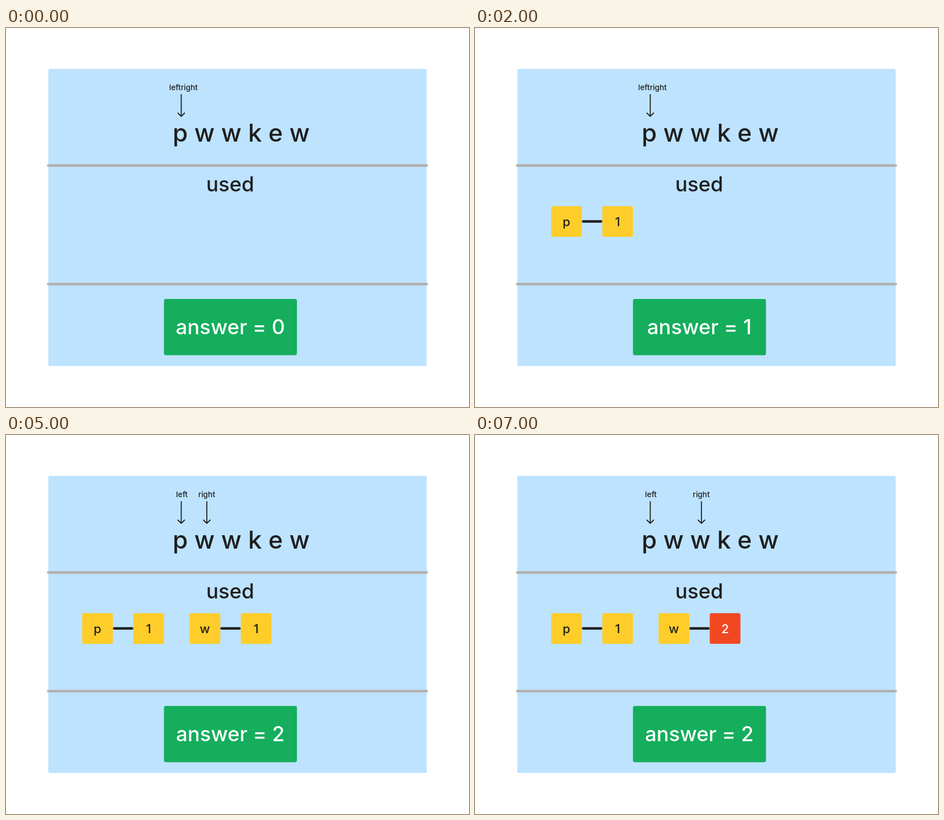
Write an HTML page that moves like this. It is 828 px wide and 677 px high and loops after 8000 ms.

```html
<!DOCTYPE html>
<html lang="en">
<head>
<meta charset="utf-8">
<title>Sliding window</title>
<style>
  html, body { margin: 0; width: 100%; height: 100%; overflow: hidden; background: #fff; }
  svg { display: block; width: 100%; height: 100%; }
  text {
    font-family: Inter, sans-serif;
    font-weight: 500;
    font-optical-sizing: none;
    text-anchor: middle;
    fill: #1e1e1e;
  }
  .small { font-size: 13.75px; }
  .tile { font-size: 22px; }
  .big { font-size: 36.6px; }
  .word { font-size: 43.9px; }
  .light { fill: #fff; }
  .rule { stroke: #b3b1af; stroke-width: 4.6; stroke-linecap: round; }
  .link { stroke: #1e1e1e; stroke-width: 4.6; stroke-linecap: round; }
  .arrow { fill: none; stroke: #1e1e1e; stroke-width: 1.8; stroke-linecap: round; stroke-linejoin: round; }
</style>
</head>
<body>
<svg id="stage" viewBox="0 0 828 677"></svg>
<script>
const LOOP = 8000;
const PITCH = 45.75;
const YELLOW = '#ffcd29', RED = '#f24822';
const stage = document.getElementById('stage');

function add(tag, attrs, parent = stage, content = '') {
  const el = document.createElementNS(stage.namespaceURI, tag);
  for (const key in attrs) el.setAttribute(key, attrs[key]);
  el.textContent = content;
  parent.appendChild(el);
  return el;
}

const box = (x, y, width, height, fill, parent) =>
  add('rect', { x, y, width, height, rx: 3.4, fill }, parent);
const label = (x, y, cls, content, parent) =>
  add('text', { x, y, class: cls }, parent, content);
const line = (x1, x2, y, cls, parent) =>
  add('line', { x1, x2, y1: y, y2: y, class: cls }, parent);
const arrow = () =>
  add('path', { class: 'arrow', d: 'M313.4 119V157.8M307.5 152L313.4 157.9L319.3 152' });

// A letter tile joined to its count tile
function pair(x, letter) {
  const g = add('g', { transform: `translate(${x} 318.2)` });
  box(0, 0, 54.9, 54.9, YELLOW, g);
  const tile = box(91.5, 0, 54.9, 54.9, YELLOW, g);
  line(57.3, 89.1, 27.3, 'link', g);
  label(27.4, 35.6, 'tile', letter, g);
  const count = label(118.9, 35.6, 'tile', '1', g);
  return { g, tile, count };
}

const show = (el, on) => el.setAttribute('visibility', on ? 'visible' : 'hidden');

box(75.6, 73.1, 676.8, 530.6, '#bde3ff');
line(75.6, 752.4, 245.6, 'rule');
line(75.6, 752.4, 457.5, 'rule');
label(420.5, 202.8, 'word', 'p w w k e w');
label(401, 291.8, 'big', 'used');
box(282.5, 484, 237.8, 100.4, '#14ae5c');

const answer = label(401.2, 547.4, 'big light', '');
const both = label(317.4, 111, 'small', 'leftright');
const left = label(314.6, 111, 'small', 'left');
const right = label(358.9 - PITCH, 111, 'small', 'right');
const leftArrow = arrow();
const rightArrow = arrow();
const pPair = pair(136.2, 'p');
const wPair = pair(328.3, 'w');

function draw(ms) {
  const step = Math.floor(ms / 1000);
  const index = Math.floor(step / 3);        // position of the right pointer
  const total = Math.floor((step + 1) / 3);  // best length so far
  const repeat = step >= 7;

  show(both, index === 0);
  for (const el of [left, right, rightArrow]) show(el, index > 0);
  for (const el of [right, rightArrow]) el.setAttribute('transform', `translate(${index * PITCH})`);

  show(pPair.g, step >= 1);
  show(wPair.g, step >= 4);
  wPair.tile.setAttribute('fill', repeat ? RED : YELLOW);
  wPair.count.textContent = repeat ? '2' : '1';
  wPair.count.classList.toggle('light', repeat);
  answer.textContent = `answer = ${total}`;
}

const start = performance.now();
function tick() {
  draw((performance.now() - start) % LOOP);
  requestAnimationFrame(tick);
}
tick();
</script>
</body>
</html>
```
